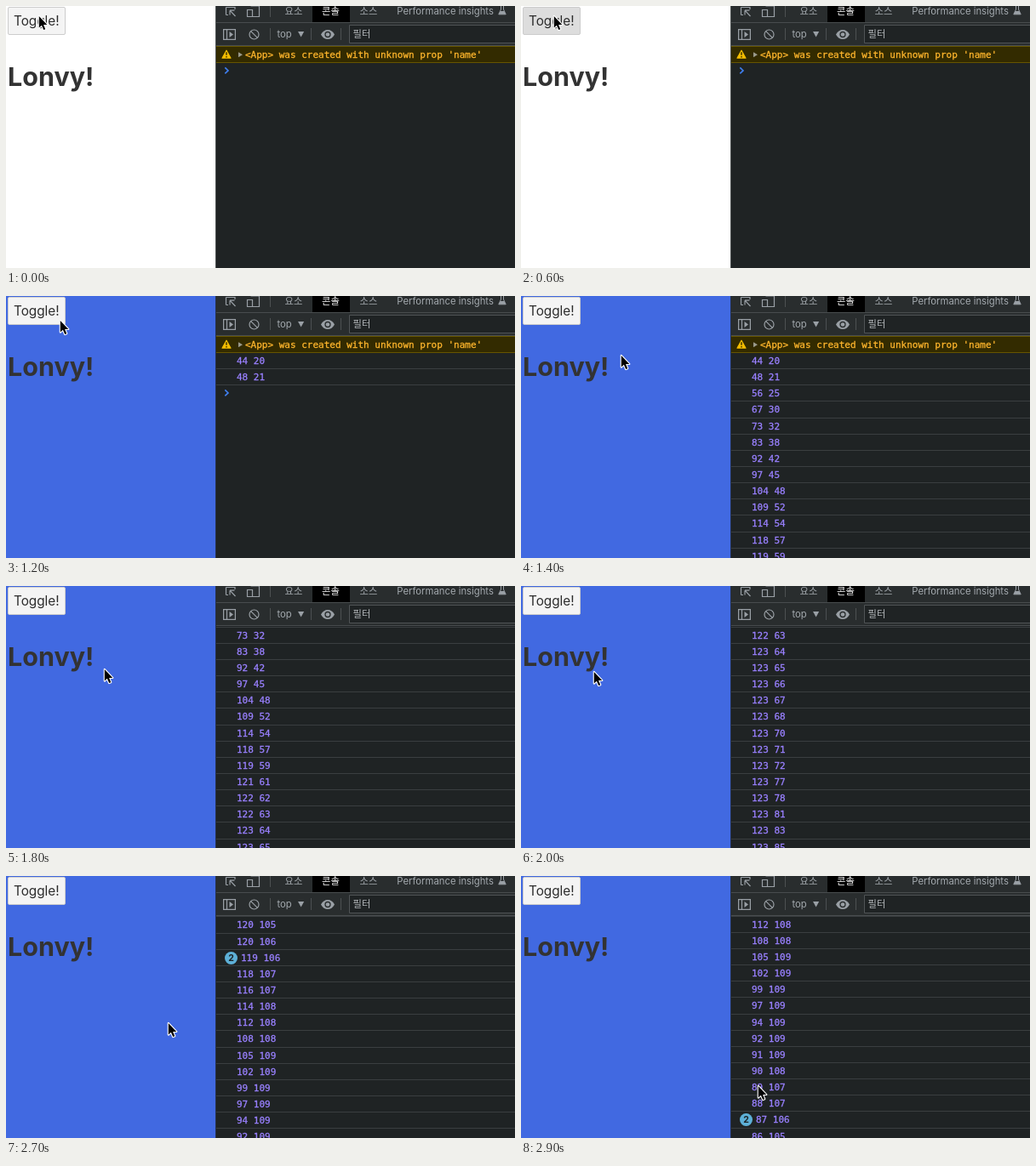
Recreate the animation shown at these times as an HTML page. Size 598 px wide and 308 px high, loop 3000 ms.

```html
<!DOCTYPE html>
<html lang="ko">
<head>
<meta charset="utf-8">
<title>Toggle and console</title>
<style>
  :root { --row: 19.15px; --lift: -18.2px; --ui: Inter, "Noto Sans CJK KR", "Noto Sans CJK", sans-serif; }
  html, body { margin: 0; width: 100%; height: 100%; overflow: hidden; }
  body { position: relative; background: #fff; font-family: var(--ui); }
  body * { box-sizing: border-box; }

  /* every animation shares one stepped 3 s clock */
  .anim { animation: 3s step-end infinite; }

  #page { position: absolute; left: 0; top: 0; width: 247px; height: 100%; animation-name: page; }
  @keyframes page { 0% { background: #fff } 23.3%, 100% { background: #4169e1 } }

  #toggle {
    position: absolute; left: 2px; top: 1px; width: 68px; height: 33px; padding-left: 6px;
    border: 1px solid #ccc; border-radius: 2px; background: #f4f4f4; color: #2c2c2c;
    font-size: 15.3px; line-height: 31px; white-space: nowrap; animation-name: press;
  }
  @keyframes press {
    0% { background: #f4f4f4 }
    20% { background: #ddd }
    23.3%, 100% { background: #f4f4f4 }
  }

  h1 {
    position: absolute; left: 2px; top: 63px; margin: 0; color: #333;
    font: 700 30.5px/40px var(--ui); white-space: nowrap; animation-name: title;
  }
  @keyframes title { 0% { opacity: 0 } 23.3%, 100% { opacity: 1 } }

  #console {
    position: absolute; left: 246px; top: 0; width: 352px; height: 100%; overflow: hidden;
    background: #1f2324; background-clip: padding-box; border-left: 1px solid rgba(31, 35, 36, .8);
    font: 11px/18px "DejaVu Sans Mono", monospace; -webkit-text-stroke: .3px;
  }
  #view { position: absolute; left: 0; right: 0; top: 47px; bottom: 0; overflow: hidden; }

  #scroll { margin-top: 0; animation-name: scroll; }
  @keyframes scroll {
    0% { margin-top: 0 }
    60% { margin-top: calc(var(--lift) - 4 * var(--row)) }
    63.3% { margin-top: calc(var(--lift) - 10 * var(--row)) }
    66.6% { margin-top: calc(var(--lift) - 15 * var(--row)) }
    70% { margin-top: calc(var(--lift) - 20 * var(--row)) }
    73.3% { margin-top: calc(var(--lift) - 24 * var(--row)) }
    76.6% { margin-top: calc(var(--lift) - 29 * var(--row)) }
    80% { margin-top: calc(var(--lift) - 33 * var(--row)) }
    83.3% { margin-top: calc(var(--lift) - 37 * var(--row)) }
    86.6% { margin-top: calc(var(--lift) - 40 * var(--row)) }
    90% { margin-top: calc(var(--lift) - 44 * var(--row)) }
    93.3% { margin-top: calc(var(--lift) - 47 * var(--row)) }
    96.6%, 100% { margin-top: calc(var(--lift) - 50.03 * var(--row)) }
  }

  #warn {
    position: relative; height: 20px; padding-left: 34px; white-space: pre; line-height: 20px;
    background: #332b00; border: solid #665500; border-width: 1px 0; color: #fdb52c;
  }
  #warn svg { position: absolute; left: 0; top: -1px; }

  #rows { height: 0; overflow: hidden; animation-name: fill; }
  @keyframes fill {
    0% { height: 0 }
    40% { height: calc(2 * var(--row)) }
    43.3% { height: calc(8 * var(--row)) }
    46.6%, 100% { height: calc(64 * var(--row)) }
  }
  .row {
    position: relative; height: var(--row); padding-left: 24px; line-height: 20.5px;
    border-bottom: 1px solid #3a3e40; color: #9980ff; white-space: pre;
  }
  .row.many { padding-left: 29px; }
  .row b {
    position: absolute; left: 10px; top: 2px; width: 15px; height: 15px; border-radius: 50%;
    background: #5db0d7; color: #1c2326; font: 700 10.5px/15px var(--ui); text-align: center;
    -webkit-text-stroke: 0;
  }

  #prompt { position: relative; height: 19px; }
  #prompt svg { display: block; }
  #caret {
    position: absolute; left: 23px; top: 3px; width: 1px; height: 13px; background: #e0e3e5;
    animation-name: caret;
  }
  @keyframes caret { 0% { opacity: 0 } 3.3% { opacity: 1 } 20%, 100% { opacity: 0 } }

  #tools { position: absolute; left: 0; top: 0; }
  #tools text { font: 11.3px var(--ui); fill: #a3a9ae; -webkit-text-stroke: 0; }

  #cursor { position: absolute; overflow: visible; left: 38px; top: 11px; animation-name: move; }
  @keyframes move {
    0% { left: 38px; top: 11px }
    40% { left: 63px; top: 28px }
    43.3% { left: 112px; top: 56px }
    46.6% { left: 117px; top: 69px }
    50% { left: 117px; top: 75px }
    53.3% { left: 117px; top: 85px }
    56.6% { left: 116px; top: 92px }
    60% { left: 115px; top: 97px }
    63.3% { left: 106px; top: 102px }
    66.6% { left: 85px; top: 100px }
    70% { left: 81px; top: 95px }
    73.3% { left: 80px; top: 90px }
    76.6% { left: 81px; top: 87px }
    80% { left: 82px; top: 85px }
    83.3% { left: 88px; top: 88px }
    86.6% { left: 122px; top: 114px }
    90% { left: 190px; top: 172px }
    93.3% { left: 252px; top: 224px }
    96.6%, 100% { left: 278px; top: 246px }
  }
  #arrow { animation-name: arrow; }
  #beam { animation-name: beam; }
  @keyframes arrow { 0%, 86.6%, 100% { opacity: 1 } 70% { opacity: 0 } }
  @keyframes beam { 0%, 86.6%, 100% { opacity: 0 } 70% { opacity: 1 } }
</style>
</head>
<body>
<div id="page" class="anim">
  <div id="toggle" class="anim">Toggle!</div>
  <h1 class="anim">Lonvy!</h1>
</div>

<div id="console">
  <div id="view">
    <div id="scroll" class="anim">
      <div id="warn"><svg width="34" height="19">
        <path d="M12 5.2 17 14.2H7Z" fill="#f4bd00" stroke="#f4bd00" stroke-width="1.2" stroke-linejoin="round"/>
        <path d="M12 7.2v3.6M12 12v1.4" stroke="#332b00" stroke-width="1.4"/>
        <path d="M26 7.2 31 10.2 26 13.2Z" fill="#9a9a8c"/>
      </svg>&lt;App&gt; was created with unknown prop 'name'</div>
      <div id="rows" class="anim"></div>
      <div id="prompt">
        <svg width="24" height="19"><path d="M10.3 5.4 14 8.9 10.3 12.4" fill="none" stroke="#3f7ff0" stroke-width="1.6"/></svg>
        <div id="caret" class="anim"></div>
      </div>
    </div>
  </div>

  <svg id="tools" width="351" height="47" viewBox="247 0 351 47">
    <path d="M247 0h351v47H247z" fill="#292d2e"/>
    <path d="M360 0h44v19h-44z" fill="#000"/>
    <path d="M247 19.5h351M247 46.5h351" stroke="#484c4e"/>
    <path d="M310.5 0v13M310.5 26v14M358.5 26v14M393.5 26v14" stroke="#4c5052"/>
    <text x="327.5" y="9.5">요소</text>
    <text x="371" y="9.5" style="fill:#fff;font-weight:500">콘솔</text>
    <text x="415.5" y="9.5">소스</text>
    <text x="459.3" y="9.5">Performance insights</text>
    <text x="318.5" y="37">top</text>
    <path d="M343 30h7.2l-3.6 6.6z" fill="#9aa0a6"/>
    <path d="M598 22.5H403.5v21H598" fill="#1f2324" stroke="#505456"/>
    <text x="407.5" y="37" style="fill:#b4b8bb">필터</text>
    <g fill="none" stroke="#9aa0a6" stroke-width="1.2">
      <path d="M258.5 10.5V1.5M258.5 1.5H269V4M258.5 10.5H261"/>
      <path d="M263 5.2 269.5 12M263 5.2V10.5M263 5.2H268.5"/>
      <path d="M287.5 0H297.5V12.5H290M283.5 4.5H289.5V12.5H283.5Z"/>
      <path d="M255.6 27.6H269.4V39.4H255.6ZM259.5 27.6V39.4"/>
      <circle cx="291.5" cy="33.5" r="5.5"/><path d="M287.6 29.6 295.4 37.4"/>
      <path d="M581.5 0V4L578.8 9.8H587.2L584.5 4V0" stroke-width="1"/>
    </g>
    <path d="M262.5 30 267 33.5 262.5 37Z" fill="#9aa0a6"/>
    <path d="M580.6 6h4.8l1.8 3.8h-8.4z" fill="#9aa0a6"/>
    <path d="M370 33.5Q373 28 378 28T386 33.5Q383 39 378 39T370 33.5Z" fill="#9aa0a6"/>
    <circle cx="378" cy="33.5" r="3" fill="#9aa0a6" stroke="#292d2e" stroke-width="1.3"/>
  </svg>
</div>

<svg id="cursor" class="anim" width="1" height="1">
  <path id="arrow" class="anim" d="M.8 1V14.6L3.9 11.7 6.2 17.1 8.3 16.2 6.1 10.9H10.3Z"
    fill="#000" stroke="#fff" stroke-width="2.2" stroke-linejoin="round" paint-order="stroke"/>
  <g id="beam" class="anim" fill="none">
    <g stroke="#fff" stroke-width="3.4">
      <path id="bar" d="M-3.2 -6.2Q0 -6.2 0 -4Q0 -6.2 3.2 -6.2M0 -4.5V4.5M-3.2 6.2Q0 6.2 0 4Q0 6.2 3.2 6.2M-1.8 2.2H1.8"/>
    </g>
    <use href="#bar" stroke="#000" stroke-width="1.1"/>
  </g>
</svg>

<script>
  // Pointer log: "x: y y ..." with an optional repeat count as "y*n".
  const log = `44: 20; 48: 21; 56: 25; 67: 30; 73: 32; 83: 38; 92: 42; 97: 45; 104: 48; 109: 52;
    114: 54; 118: 57; 119: 59; 121: 61; 122: 62 63;
    123: 64 65 66 67 68 70 71 72 77 78 81 83 85 88 90 92 94 95 96 97;
    122: 99 100 101 102*2; 121: 102 103 104*3 105*3; 120: 105 106; 119: 106*2;
    118: 107; 116: 107; 114: 108; 112: 108; 108: 108; 105: 109; 102: 109; 99: 109; 97: 109;
    94: 109; 92: 109; 91: 109; 90: 108; 89: 107; 88: 107; 87: 106*2; 86: 105`;

  const rows = document.getElementById('rows');

  function addRow(x, y, count) {
    const row = document.createElement('div');
    row.className = count ? 'row many' : 'row';
    row.textContent = `${x} ${y}`;
    if (count) {
      const badge = document.createElement('b');
      badge.textContent = count;
      row.append(badge);
    }
    rows.append(row);
  }

  for (const run of log.split(';')) {
    const [x, ys] = run.trim().split(': ');
    for (const item of ys.split(' ')) addRow(x, ...item.split('*'));
  }
</script>
</body>
</html>
```
